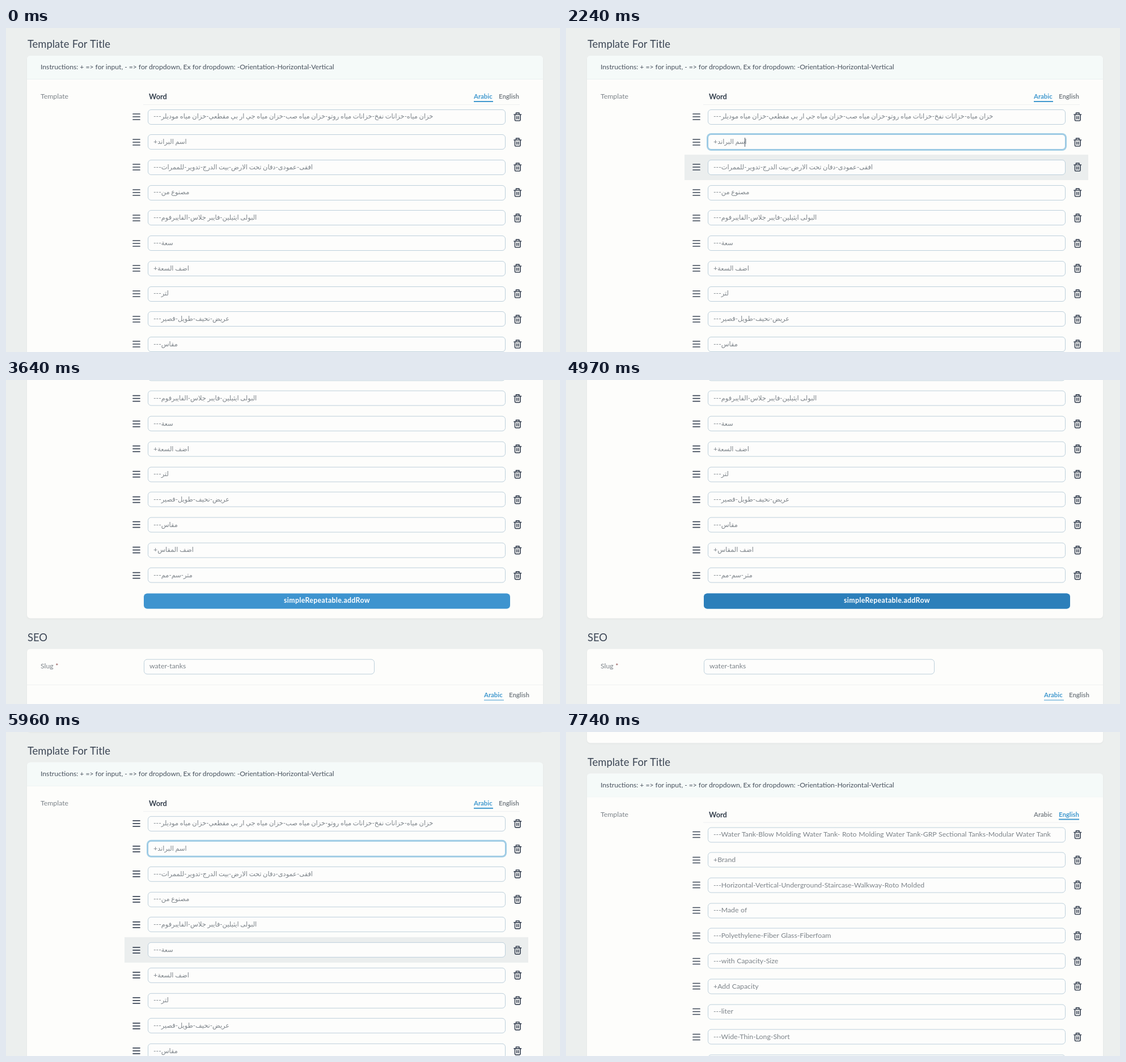
These frames come from a looping animation (977 by 573 pixels, 7.99 s). An HTML page:

```html
<!DOCTYPE html>
<html lang="en">
<head>
<meta charset="utf-8">
<title>Template editor</title>
<style>
  html, body { margin: 0; width: 100%; height: 100%; overflow: hidden; background: #ecefee; }
  #stage { position: relative; width: 977px; height: 573px; overflow: hidden; }
  #page { position: absolute; left: 0; top: 0; width: 977px; }
  #page div, #page svg { position: absolute; box-sizing: border-box; }
  .text {
    font: 12.3px/20px Lato, "DejaVu Sans", sans-serif;
    word-spacing: .04em; white-space: pre; color: #7c8389;
    margin-top: -.065em;
  }
  .title { font-size: 18.4px; color: #3c4655; }
  .dark { font-size: 12.2px; word-spacing: -.01em; color: #48525e; }
  .bold { font-weight: 700; font-size: 12.8px; color: #35404e; }
  .tab { font-weight: 700; font-size: 11.4px; }
  .tab.on { color: #4099cf; }
  .ar { font-size: 11.4px; word-spacing: -.02em; }
  .card { left: 37px; width: 910px; background: #fdfdfb; border-radius: 6px; box-shadow: 0 1px 3px #0000000d; }
  .strip { left: 37px; width: 910px; background: #f5faf9; border-bottom: 1px solid #e9f0f2; border-radius: 6px 6px 0 0; }
  .line { height: 1px; background: #eef0f1; }
  .underline { height: 1.6px; background: #4099cf; }
  .row { left: 209px; width: 712px; height: 44.7px; }
  .row.hover { background: #ebeeee; }
  .input { height: 27px; border: 1px solid #bccfdb; border-radius: 6px; background: #fdfdfc; }
  .input.focus { border-color: #93c4e0; box-shadow: 0 0 0 2px #a2cee6; }
  .button { left: 243px; width: 646px; height: 27px; border-radius: 6px; background: #439ad5; }
  #pressed { background: #2c7fba; }
  .caption { left: 243px; width: 646px; text-align: center; letter-spacing: .35px; color: #fff; font-weight: 700; }
  #caret { left: 315px; width: 1px; height: 16px; background: #48525e; }
  svg { fill: none; stroke: #3d4757; stroke-width: 1.7; stroke-linecap: round; stroke-linejoin: round; }
  .english .ar, #page:not(.english) .en { display: none; }
</style>
</head>
<body>
<div id="stage"><div id="page"></div></div>
<script>
const LOOP = 7990, FIRST_ROW = 157, ROW_STEP = 44.72, BUTTON = 13;
const FOCUS_AT = 1810, SWITCH_AT = 7520;

// prefix, Arabic words, English words
const rows = [
  ['---', 'خزان مياه-خزانات نفخ-خزانات مياه روتو-خزان مياه صب-خزان مياه جي ار بي مقطعي-خزان مياه موديلر',
    'Water Tank-Blow Molding Water Tank- Roto Molding Water Tank-GRP Sectional Tanks-Modular Water Tank'],
  ['+', 'اسم البراند', 'Brand'],
  ['---', 'افقى-عمودى-دفان تحت الارض-بيت الدرج-تدوير-للممرات',
    'Horizontal-Vertical-Underground-Staircase-Walkway-Roto Molded'],
  ['---', 'مصنوع من', 'Made of'],
  ['---', 'البولى ايثيلين-فايبر جلاس-الفايبرفوم', 'Polyethylene-Fiber Glass-Fiberfoam'],
  ['---', 'سعة', 'with Capacity-Size'],
  ['+', 'اضف السعة', 'Add Capacity'],
  ['---', 'لتر', 'liter'],
  ['---', 'عريض-نحيف-طويل-قصير', 'Wide-Thin-Long-Short'],
  ['---', 'مقاس', 'Size'],
  ['+', 'اضف المقاس', 'Add Size'],
  ['---', 'متر-سم-مم', 'Meter-cm-mm'],
];

// [time, hovered row]; 0 is none
const hovers = [
  [0, 0], [330, 3], [450, 2], [2240, 3], [2700, 4], [2820, 7], [3080, 9], [3240, 10],
  [3560, 11], [3600, BUTTON], [5400, 12], [5720, 8], [5960, 6],
  [6800, 5], [6860, 4], [6920, 3], [6980, 2], [7040, 1], [7120, 0],
];

const box = (cls, style, inner = '', id = '') =>
  `<div class="${cls}" style="${style}"${id && ` id="${id}"`}>${inner}</div>`;
const text = (x, centre, str, cls = '') =>
  box('text ' + cls, `left:${x}px;top:${centre - 10}px`, str);
const icon = (x, y, path) =>
  `<svg style="left:${x}px;top:${y}px" width="16" height="18"><path d="${path}"/></svg>`;
const line = (x, y, width, cls = 'line') =>
  box(cls, `left:${x}px;top:${y}px;width:${width}px`);

function rowHTML([prefix, arabic, english], i) {
  const y = FIRST_ROW + i * ROW_STEP;
  return box('row', `top:${y - 22.4}px`) +
    icon(222, y - 9, 'M2 4H14M2 9H14M2 14H14') +
    box('input', `left:250px;width:631px;top:${y - 13.5}px`) +
    text(260, y, `${prefix}<span class="ar">${arabic}</span><span class="en">${english}</span>`) +
    icon(894, y - 9, 'M2 5H14.5M5.5 5V2.2H11V5M3.5 5V14.5Q3.5 16 5 16H11.5Q13 16 13 14.5V5M6.8 8.3V12.7M9.7 8.3V12.7');
}

const page = document.getElementById('page');
page.innerHTML =
  box('card', 'top:-205px;height:200px') +
  text(38, 29, 'Template For Title', 'title') +
  box('card', 'top:49px;height:676px') +
  box('strip', 'top:49px;height:42px') +
  text(61, 69.5, 'Instructions: + =&gt; for input, - =&gt; for dropdown, Ex for dropdown: -Orientation-Horizontal-Vertical', 'dark') +
  text(61, 122, 'Template') +
  text(252, 121.5, 'Word', 'bold') +
  text(825, 121.7, 'Arabic', 'tab') +
  text(869, 121.7, 'English', 'tab') +
  line(825, 129, 34, 'underline ar') +
  line(869, 129, 36, 'underline en') +
  line(242, 134.5, 664) +
  rows.map(rowHTML).join('') +
  box('', `top:${FIRST_ROW + ROW_STEP - 8}px`, '', 'caret') +
  box('button', 'top:680.5px') +
  box('button', 'top:680.5px', '', 'pressed') +
  box('text caption', 'top:684px', 'simpleRepeatable.addRow') +
  text(38, 759.5, 'SEO', 'title') +
  box('card', 'top:778.5px;height:300px') +
  text(61, 810, 'Slug <span style="color:#8a4a4a">*</span>') +
  box('input', 'left:243px;width:407px;top:796.5px') +
  text(253, 810, 'water-tanks') +
  line(37, 841.5, 910) +
  text(843, 861, 'Arabic', 'tab on') +
  text(887, 861, 'English', 'tab') +
  line(843, 868.5, 35, 'underline');

const rowBoxes = page.querySelectorAll('.row');
const brandInput = page.querySelectorAll('.input')[1];
const [arabicTab, englishTab] = page.querySelectorAll('.tab');
const caret = document.getElementById('caret');
const pressed = document.getElementById('pressed');

const ramp = (t, from, to) => Math.min(1, Math.max(0, (t - from) / (to - from)));
const easeOut = (p, power) => 1 - (1 - p) ** power;

const scrollAt = t =>
  303.4 * easeOut(ramp(t, 2560, 3240), 1.95)
  - 322.4 * easeOut(ramp(t, 5300, 6100), 1.785)
  - 5.5 * ramp(t, 6390, 6520);

function draw(t) {
  page.style.transform = `translateY(${-scrollAt(t)}px)`;

  const hovered = hovers.findLast(([start]) => start <= t)[1];
  rowBoxes.forEach((row, i) => row.classList.toggle('hover', i + 1 === hovered));
  pressed.style.opacity = ramp(t, 3600, 3790) - ramp(t, 5400, 5590);

  const english = t >= SWITCH_AT;
  const focused = t >= FOCUS_AT && !english;
  const caretOn = t < 5220 || Math.floor((t - 5220) / 500) % 2 === 0;
  brandInput.classList.toggle('focus', focused);
  caret.style.opacity = focused && caretOn ? 1 : 0;

  page.classList.toggle('english', english);
  arabicTab.classList.toggle('on', !english);
  englishTab.classList.toggle('on', english);
}

const start = performance.now();
function tick() {
  draw((performance.now() - start) % LOOP);
  requestAnimationFrame(tick);
}
tick();
</script>
</body>
</html>
```
